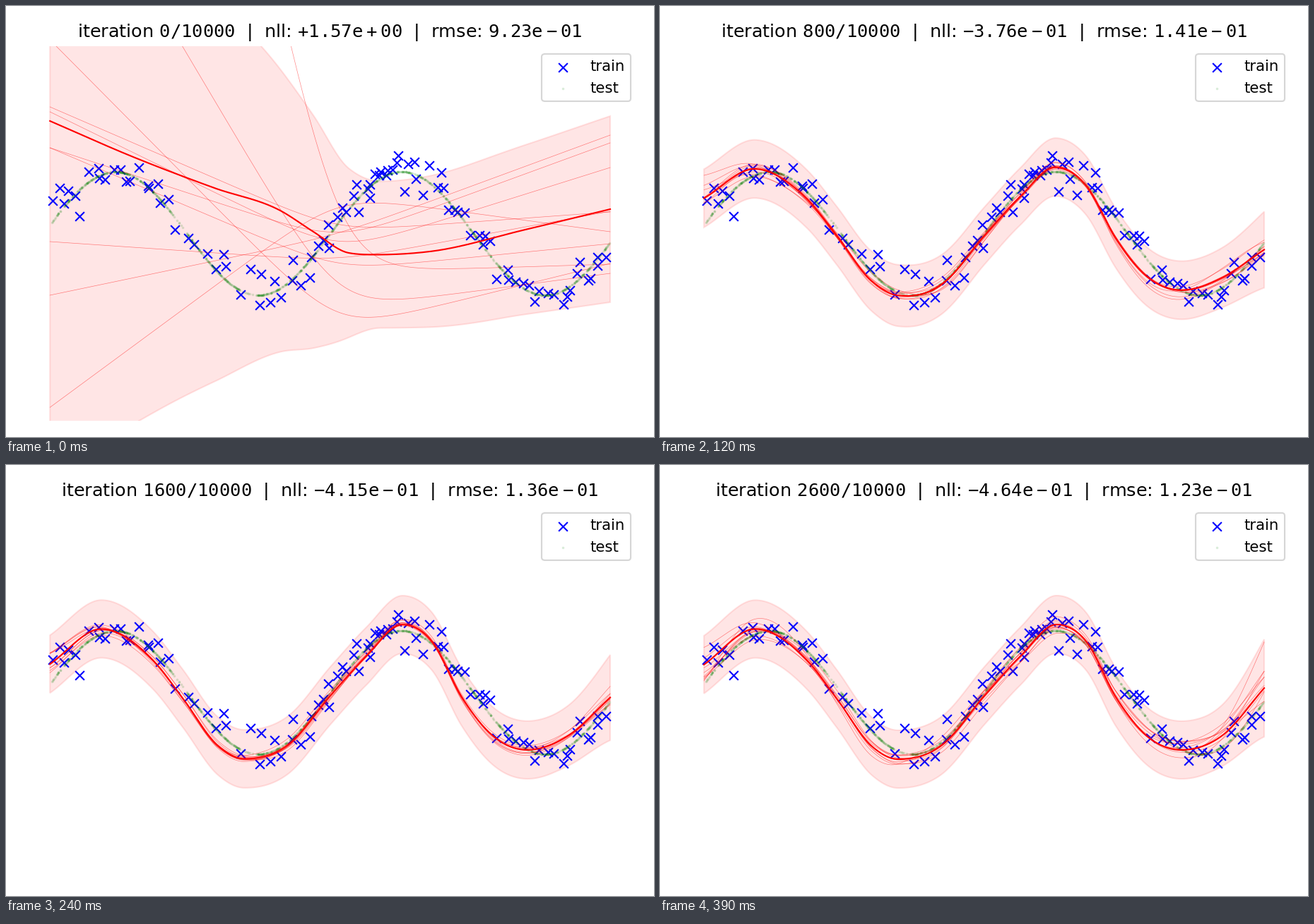
Recreate the animation shown at these times as a matplotlib script. Size 917x611 px, loop 1.42 s.

```python
import numpy as np
import matplotlib.pyplot as plt
from matplotlib.animation import FuncAnimation

W, H = 917, 611
DPI = W / 6
LEFT, RIGHT, TOP, BOTTOM = 22.4, 894.6, 57, 588.3   # axes box, stage pixels
X0, X1 = 62.2, 855                                  # extent of the data
TICK, LOOP, STEP_MS, LAST = 10, 1420, 30, 13

# Key points of the predictive mean: untrained, early and late in training
PRIOR = [(X0, 163), (180, 214), (295, 258), (390, 291), (435, 320),
         (485, 350), (525, 352.5), (600, 348), (735, 317), (X1, 288)]
EARLY = [(X0, 206), (137, 222), (208, 252), (295, 332), (372, 384),
         (415, 366), (460, 317), (505, 267), (548, 240), (622, 304),
         (690, 380), (765, 396.5), (X1, 383)]
LATE = [(X0, 283), (135, 232.5), (208, 277), (250, 331), (300, 399),
        (337, 417), (398, 398), (460, 326), (510, 271), (561, 226),
        (603, 250), (645, 329), (690, 385), (738, 404), (795, 384)]
PRIOR_HALF = [(X0, 497), (250, 313), (390, 199), (435, 165), (485, 120),
              (530, 104), (700, 117), (X1, 132)]

# Untrained draws: height at the left edge, the pivot and the right edge
PIVOT = 470
FANS = [(48, 460, 365), (-260, 430, 379), (-1500, 378, 366), (143, 320, 292),
        (150, 350, 229), (201, 375, 337), (201, 335, 194), (334, 362, 291),
        (410, 325, 183), (569, 268, 320)]

# Scores shown in the title
KEYS = [0, 1, 4, 6, 8, 11, 13]
NLL = [1.57, .216, -.376, -.410, -.415, -.415, -.464]
RMSE = [.923, .300, .141, .138, .136, .140, .123]


def curve(points):
    """Smooth curve through points, flat at their turning points."""
    x, y = np.array(points, float).T
    h = np.diff(x)
    d = np.diff(y) / h
    m = np.r_[d[0], (h[1:] * d[:-1] + h[:-1] * d[1:]) / (h[1:] + h[:-1]), d[-1]]
    limit = 3 * np.minimum(abs(d[:-1]), abs(d[1:])) * (d[:-1] * d[1:] > 0)
    m[1:-1] = np.clip(m[1:-1], -limit, limit)
    k = np.clip(np.searchsorted(x, xs) - 1, 0, len(h) - 1)
    t = (xs - x[k]) / h[k]
    return ((1 + 2 * t) * (1 - t)**2 * y[k] + t * (1 - t)**2 * h[k] * m[k]
            + t * t * (3 - 2 * t) * y[k + 1]
            - t * t * (1 - t) * h[k] * m[k + 1])


def bump(center, width):
    return np.exp(-((xs - center) / width)**2)


def soft(z, width=30):
    """Rounded ramp: zero on the left, z on the right."""
    return width * np.logaddexp(0, z / width)


def posterior(step):
    """Predictive mean and half height of the band."""
    if step == 0:
        return curve(PRIOR), curve(PRIOR_HALF)
    ease = 1 - np.exp(-(step - 1) / 1.5)
    late = curve(LATE + [(X1, 350 - 2.6 * step)])
    mean = (1 - ease) * curve(EARLY) + ease * late
    flare = np.clip((xs - 770) / 85, 0, 1)**2
    early_half = 43 + 18 * bump(345, 54) - 6 * bump(495, 55) + 6 * bump(645, 55)
    half = (1 - ease) * early_half + ease * 41 + (6 + 1.7 * step) * flare
    return mean, half


def draws(step, mean):
    """Ten sampled functions."""
    if step == 0:
        left = soft(PIVOT - xs) / (PIVOT - X0)
        right = soft(xs - PIVOT) / (X1 - PIVOT)
        return [mid + (a - mid) * left + (b - mid) * right
                for a, mid, b in FANS]
    rng = np.random.default_rng(40 + step)
    u = (xs - X0) / (X1 - X0)
    spread = 5 + 7 * np.abs(2 * u - 1)**6 + 9 / step * bump(345, 90)
    flare = np.clip((u - .89) / .11, 0, 1)**1.4 * max(step - 9, 0) / 4
    out = []
    for k in range(len(FANS)):
        wave = sum(rng.normal(0, .7)
                   * np.sin(2 * np.pi * (f * u + rng.random()))
                   for f in (.6, 1.7, 3.1))
        out.append(mean + spread * wave - 70 * .5**k * flare)
    return out


def build(step):
    mean, half = posterior(step)
    band = np.column_stack([np.r_[xs, xs[::-1]],
                            np.r_[mean - half, (mean + half)[::-1]]])
    nll, rmse = (np.interp(step, KEYS, v) for v in (NLL, RMSE))
    title = (rf"iteration $\mathtt{{{200 * step}/10000}}$  |  "
             rf"nll: $\mathtt{{{nll:+.2e}}}$  |  "
             rf"rmse: $\mathtt{{{rmse:.2e}}}$")
    return mean, band, draws(step, mean), title


def truth(x):
    return 322.5 - 87.5 * np.cos(2 * np.pi * (x - 154.5) / 405.5)


xs = np.linspace(X0, X1, 320)
states = [build(s) for s in range(LAST + 1)]

# Noisy training points with uneven density, dense clean test points
rng = np.random.default_rng(7)
deciles = [66, 148, 239, 360, 441, 505, 550, 621, 691, 779, 849]
train_x = np.interp(np.linspace(0, 10, 98), range(11), deciles)
train_x = np.clip(train_x + rng.normal(0, 4, 98), 66, 849)
train_y = truth(train_x) + rng.normal(0, 17, 98)
test_x = rng.uniform(X0, X1, 1000)

fig = plt.figure(figsize=(W / DPI, H / DPI), dpi=DPI, facecolor="white")
ax = fig.add_axes([LEFT / W, 1 - BOTTOM / H,
                   (RIGHT - LEFT) / W, (BOTTOM - TOP) / H])
ax.set(xlim=(LEFT, RIGHT), ylim=(BOTTOM, TOP), autoscale_on=False)
ax.axis("off")

fill, = ax.fill([X0, X1, X1], [100, 100, 200], color="red", alpha=.1, lw=1)
ax.scatter(train_x, train_y, marker="x", c="blue", s=36, lw=1, label="train")
ax.scatter(test_x, truth(test_x), c="green", s=2.8, lw=0, alpha=.15,
           label="test")
thin = [ax.plot([], [], color="red", lw=.3, alpha=.5)[0] for _ in FANS]
line, = ax.plot([], [], color="red", lw=1)
ax.legend(loc="upper right", fontsize=10)
title = ax.set_title("", fontsize=12, pad=6)


def update(i):
    mean, band, samples, text = states[min(i * TICK // STEP_MS, LAST)]
    fill.set_xy(band)
    line.set_data(xs, mean)
    for ln, ys in zip(thin, samples):
        ln.set_data(xs, ys)
    title.set_text(text)
    return [fill, line, title, *thin]


anim = FuncAnimation(fig, update, frames=LOOP // TICK, interval=TICK,
                     repeat=True, repeat_delay=0)
plt.show()
```
